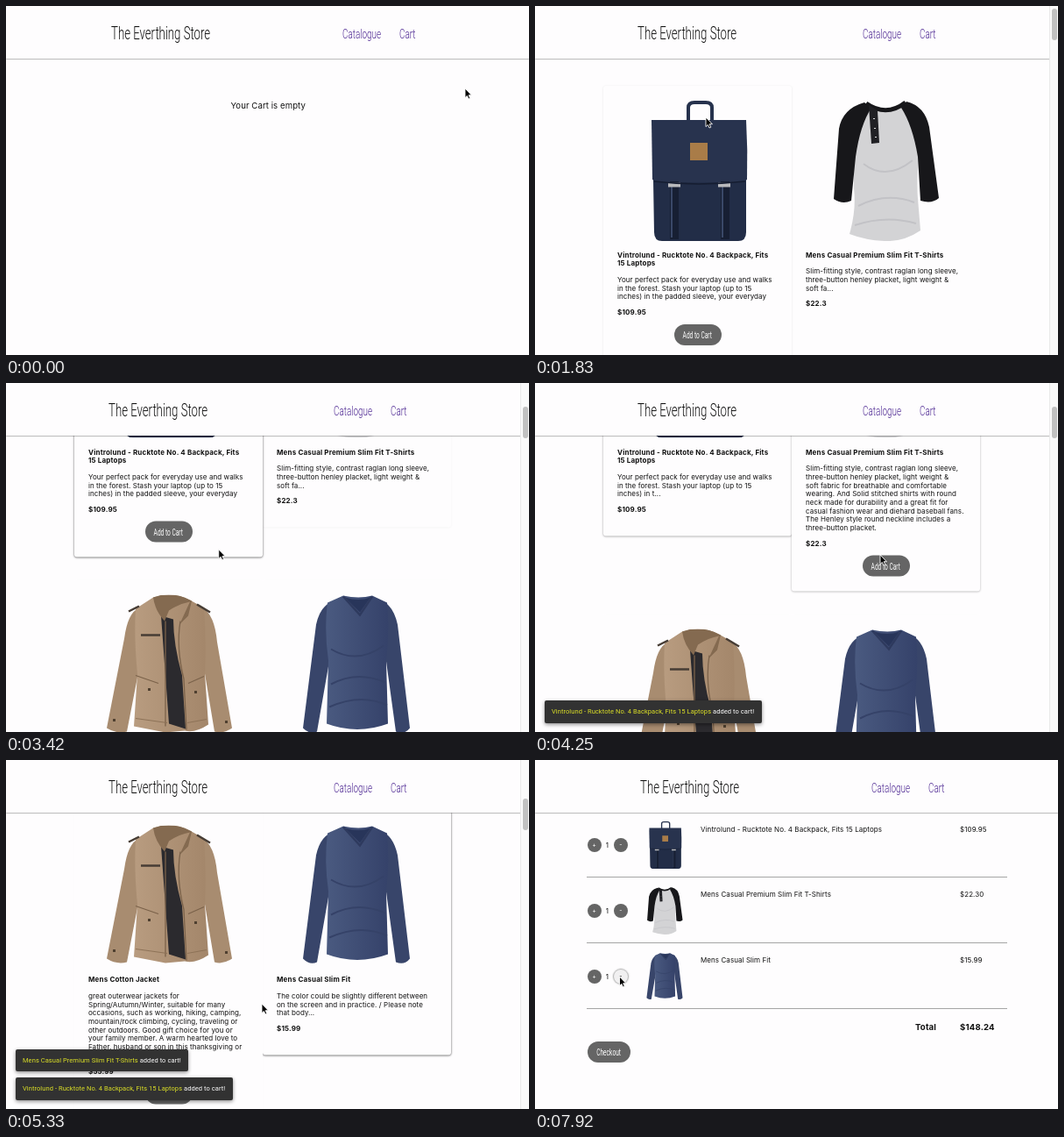
Write an HTML page that moves like this. It is 597 px wide and 398 px high and loops after 8000 ms.

```html
<!DOCTYPE html>
<html lang="en">
<head>
<meta charset="utf-8">
<title>Store</title>
<style>
html, body { margin: 0; width: 100%; height: 100%; overflow: hidden; background: #fefdfe; }
#stage { position: relative; width: 597px; height: 398px; overflow: hidden; background: #fefdfe;
  color: #111; font: 8px/9.7px Inter, sans-serif; letter-spacing: .07px; white-space: nowrap; }
#stage [hidden] { display: none; }
.page { position: absolute; inset: 0; }
.label { position: absolute; line-height: 0; }
.narrow { font-family: Roboto, sans-serif; font-weight: 300; letter-spacing: 0; transform: scaleX(.66); transform-origin: 0 0; }
b { font-weight: 700; letter-spacing: .17px; }
header { position: absolute; inset: 0 0 auto; height: 59.5px; background: #fefdfe; box-shadow: 0 .5px 1.5px rgba(0,0,0,.65); }
header .narrow { top: 32px; font-size: 15px; color: #4b2591; }
header #brand { top: 30.5px; font-size: 20px; color: #111; }

#list { position: absolute; left: 78px; top: 91px; }
.row { display: flex; align-items: flex-start; margin-bottom: 26px; }
.card { position: relative; box-sizing: border-box; width: 215px; padding: 17px 16px 16.5px; background: #fefdfe; border-radius: 3px; }
.card.open { z-index: 1; }
.card::before { content: ""; position: absolute; inset: 0; border-radius: 3px; opacity: var(--glow, 0);
  box-shadow: 0 .5px 2.5px rgba(0,0,0,.75); }
.card > * { position: relative; white-space: pre; }
.card svg { display: block; width: 150px; height: 160px; margin: 0 auto 11.5px; }
.card b { display: block; }
.card p { margin: 9px 0 8px; }
.card .full, .card .pill { display: none; }
.card.open .full, .card.open .pill { display: block; }
.card.open .short { display: none; }
.card .price { margin-bottom: 8.5px; }
.pill { width: 54px; height: 24px; margin: 0 auto; border-radius: 12px; background: #656565; color: #fff; text-align: center; }
.pill span { display: inline-block; font-size: 10px; font-weight: 400; line-height: 25px; transform-origin: 50% 0; margin: 0 -20px; }

#bar { position: absolute; right: 0; top: 0; width: 10px; height: 398px; background: #fafafa; box-shadow: inset 1px 0 #e9e9e9; }
#thumb { position: absolute; left: 2.5px; width: 6.5px; height: 36px; border-radius: 4px; background: #c1c1c1; }

.toast { position: absolute; left: 10.5px; box-sizing: border-box; min-width: 172px; height: 25.5px; padding: 0 8.5px;
  border-radius: 2px; background: #323232; color: #fff; font: 7.5px/25.5px Roboto, sans-serif;
  box-shadow: 0 1.5px 4px rgba(0,0,0,.45); }
.toast i { font-style: normal; color: #dde126; }

.rule { position: absolute; left: 59px; width: 479.5px; height: 1px; background: #a5a5a5; }
.round { position: absolute; box-sizing: border-box; width: 16px; height: 16px; border-radius: 50%;
  background: #656565; color: #fff; font-size: 7px; line-height: 16px; text-align: center; }
.round.hot { background: #f1f0f1; color: #222; box-shadow: 0 0 1.5px 1px #aaa; }
#cart svg { position: absolute; left: 123px; width: 50.6px; height: 54px; }
#cart .pill { position: absolute; left: 59.5px; top: 321px; width: 49.5px; }
.total { font-size: 9.6px; }
#cursor { position: absolute; left: 0; top: 0; width: 14px; height: 18px; overflow: visible; }
</style>
</head>
<body>
<svg width="0" height="0" style="position:absolute">
  <linearGradient id="wool"><stop stop-color="#4a5a80"/><stop offset="1" stop-color="#35426a"/></linearGradient>
  <linearGradient id="canvas"><stop stop-color="#b89c80"/><stop offset="1" stop-color="#a3866a"/></linearGradient>
  <symbol id="pack" viewBox="-75 0 150 160">
    <path d="M-11 24V8q0-6 7-6H9q7 0 7 6v16" fill="none" stroke="#26324d" stroke-width="4"/>
    <path d="M-52 30H55V150q0 10-9 10H-41q-9 0-9-10z" fill="#222d47"/>
    <path d="M-53 22H55q2 34 1 68l-6 3H-46l-6-3z" fill="#28334e"/>
    <path d="M-27 92v66M31 92v66" stroke="#171f33" stroke-width="10"/>
    <path d="M-30 98v58M28 98v58" stroke="#3a4868" stroke-width="2"/>
    <path d="M-34 96h14M23 96h14" stroke="#b9babd" stroke-width="5"/>
    <path d="M-50 92q50 6 104 0" fill="none" stroke="#151d31" stroke-width="1.5"/>
    <path d="M-9 48h20v20h-20z" fill="#a97c48"/>
  </symbol>
  <symbol id="tee" viewBox="-75 0 150 160">
    <path d="M-23 5Q0 16 21 5L38 60Q34 90 36 112L39 148Q20 161-2 160T-42 152Q-34 124-37 100V60z" fill="#d3d3d5"/>
    <path d="M-25 2Q-50 9-54 32L-60 112Q-50 119-40 114L-35 64Q-30 28-17 8zM23 1Q44 6 49 30L60 111Q52 118 39 114L36 64Q30 28 17 8z" fill="#17171a"/>
    <path d="M-23 3Q0 19 22 2" fill="none" stroke="#17171a" stroke-width="5"/>
    <path d="M-20 5l10 6 2 37-9 1z" fill="#202024"/>
    <path d="M-14 20v1M-13 31v1M-12 41v1" stroke="#ddd" stroke-width="2"/>
    <path d="M-26 72Q0 92 30 68M-32 120Q0 104 32 116M-36 142Q0 130 34 140" fill="none" stroke="#c2c2c6" stroke-width="2"/>
  </symbol>
  <symbol id="jacket" viewBox="-75 0 150 160">
    <path d="M-34 15Q-47 20-51 50L-71 152Q-60 159-48 156L-34 84zM38 15Q52 22 55 54L72 152Q62 159 52 156L40 84z" fill="#a88c70"/>
    <path d="M-18 3Q4-4 24 6L40 15Q43 60 41 90L45 148Q30 158 18 155L-4 157-40 150-36 90Q-40 50-38 16z" fill="url(#canvas)"/>
    <path d="M-9 24L5 28Q5 56 15 92L19 153 0 147z" fill="#2b2a2e"/>
    <path d="M-18 3Q-16 18-5 30L0 18Q12 10 24 8L12 34 22 24 26 7Q4-5-18 3z" fill="#846a50"/>
    <path d="M13 30Q8 60 17 96L20 154M-4 30V150M-38 92l26 9M22 101l18-8" fill="none" stroke="#7b624a" stroke-width="1.3"/>
    <path d="M-46 19l12-6M32 11l15 9M-32 46h22" stroke="#473d35" stroke-width="2.5"/>
    <path d="M-24 108h3M29 111h3M-64 143h3M64 145h3" stroke="#4f4030" stroke-width="3"/>
    <path d="M-38 141l36 5M21 146l22-4" stroke="#8d7257"/>
  </symbol>
  <symbol id="sweater" viewBox="-75 0 150 160">
    <path d="M-26 7Q-42 11-47 34L-62 152Q-54 160-46 156L-32 76zM26 6Q41 11 46 34L60 152Q54 160 44 156L33 76z" fill="#38456a"/>
    <path d="M-16 1Q2 5 17 1L34 9Q37 40 33 76L35 147Q0 160-35 147L-33 75Q-38 40-34 9z" fill="url(#wool)"/>
    <path d="M-14 3Q2 8 15 3L3 20z" fill="#28355a"/>
    <path d="M-16 2L3 23 17 2" fill="none" stroke="#2e3a5e" stroke-width="2.5"/>
    <path d="M-30 62Q0 80 30 58M-30 102Q0 86 32 100M-32 128Q4 112 34 126" fill="none" stroke="#354268" stroke-width="2"/>
  </symbol>
</svg>
<div id="stage">
  <div class="page" id="empty"><span class="label" style="left:256.5px;top:114px;font-size:9.6px">Your Cart is empty</span></div>
  <div class="page" id="shop"><div id="list"></div></div>
  <div class="page" id="cart"></div>
  <header>
    <span class="label narrow" id="brand">The Everthing Store</span>
    <span class="label narrow" id="catalogue">Catalogue</span>
    <span class="label narrow" id="cartLink">Cart</span>
  </header>
  <div id="bar"><div id="thumb"></div></div>
  <div id="toasts"></div>
  <svg id="cursor" stroke="#fff" stroke-width=".9" stroke-linejoin="round">
    <path id="arrow" d="M0 0V10.6L2.4 8.4 4 12 5.8 11.2 4.2 7.7H7.4z"/>
    <path id="beam" d="M-1.5-4.5Q0-4.5 0-3.5Q0-4.5 1.5-4.5M0-3.5V3.5M-1.5 4.5Q0 4.5 0 3.5Q0 4.5 1.5 4.5" fill="none" stroke="#333"/>
    <path id="hand" d="M-1 0Q0-1 1 0V4L5 5Q6 5 6 7L5 11H-1L-4 7Q-4 5-2 6L-1 7z" fill="#fff" stroke="#111"/>
  </svg>
</div>
<script>
const $ = id => document.getElementById(id);
const LOOP = 8000, SHOP_AT = 1500, CART_AT = 7000, FADE = 200;

const products = [
  { art: 'pack', name: 'Vintrolund - Rucktote No. 4 Backpack, Fits\n15 Laptops', price: '$109.95',
    short: 'Your perfect pack for everyday use and walks\nin the forest. Stash your laptop (up to 15\ninches) in t...',
    full: 'Your perfect pack for everyday use and walks\nin the forest. Stash your laptop (up to 15\ninches) in the padded sleeve, your everyday' },
  { art: 'tee', name: 'Mens Casual Premium Slim Fit T-Shirts', price: '$22.3',
    short: 'Slim-fitting style, contrast raglan long sleeve,\nthree-button henley placket, light weight &amp;\nsoft fa...',
    full: 'Slim-fitting style, contrast raglan long sleeve,\nthree-button henley placket, light weight &amp;\nsoft fabric for breathable and comfortable\nwearing. And Solid stitched shirts with round\nneck made for durability and a great fit for\ncasual fashion wear and diehard baseball fans.\nThe Henley style round neckline includes a\nthree-button placket.' },
  { art: 'jacket', name: 'Mens Cotton Jacket', price: '$55.99',
    short: 'great outerwear jackets for\nSpring/Autumn/Winter, suitable for many\noccasions, such as working, hiki...',
    full: 'great outerwear jackets for\nSpring/Autumn/Winter, suitable for many\noccasions, such as working, hiking, camping,\nmountain/rock climbing, cycling, traveling or\nother outdoors. Good gift choice for you or\nyour family member. A warm hearted love to\nFather, husband or son in this thanksgiving or\nChristmas Day.' },
  { art: 'sweater', name: 'Mens Casual Slim Fit', price: '$15.99',
    short: 'The color could be slightly different between\non the screen and in practice. / Please note\nthat body...',
    full: 'The color could be slightly different between\non the screen and in practice. / Please note\nthat body builds vary by person, therefore,\ndetailed size information should be reviewed\nbelow on the product description.' },
];
const [pack, tee, jacket, sweater] = products.keys();
const flat = p => p.name.replace('\n', ' ');
const art = (p, style = '') => `<svg style="${style}"><use href="#${p.art}"/></svg>`;
const pill = text => `<div class="pill"><span class="narrow">${text}</span></div>`;
const label = (x, y, text, cls = '') => `<span class="label ${cls}" style="left:${x}px;top:${y}px">${text}</span>`;

const card = p => `<div class="card">${art(p)}<b>${p.name}</b><p class="short">${p.short}</p>` +
  `<p class="full">${p.full}</p><b class="price">${p.price}</b>${pill('Add to Cart')}</div>`;
$('list').innerHTML = [0, 2].map(i => `<div class="row">${products.slice(i, i + 2).map(card).join('')}</div>`).join('');

const bought = [pack, tee, sweater].map(i => products[i]);
const round = (x, y, sign) => `<span class="round" style="left:${x - 8}px;top:${y - 8}px">${sign}</span>`;
$('cart').innerHTML = bought.map((p, i) => {
  const y = 97 + i * 74.8;
  return round(67.5, y, '+') + label(80.8, y, '1') + round(98, y, '-') + art(p, `top:${y - 27}px`) +
    label(189, y - 18.5, flat(p)) + label(485, y - 18.5, p.price.replace(/\.3$/, '.30')) +
    `<div class="rule" style="top:${y + 36}px"></div>`;
}).join('') + label(434, 305, '<b>Total</b>', 'total') + label(485, 305, '<b>$148.24</b>', 'total') + pill('Checkout');

$('toasts').innerHTML = bought.map((p, i) =>
  `<div class="toast" style="top:${362 - i * 32.3}px"><i>${flat(p)}</i> added to cart!</div>`).join('');

const cards = [...document.querySelectorAll('.card')];
const toasts = [...document.querySelectorAll('.toast')];
const lastMinus = [...document.querySelectorAll('.round')].pop();

// [time, x, y]
const pointer = [[40, 524, 94], [400, 370, 8], [750, 193, 43], [960, 193, 43], [1170, 400, 30], [1500, 400, 30],
  [1820, 195, 127], [1900, 195, 127], [2230, 356, 231], [3050, 356, 231], [3650, 188, 170], [3950, 188, 170],
  [4250, 394, 196], [4700, 396, 199], [5060, 396, 230], [5330, 292, 278], [5750, 400, 348],
  [6050, 400, 348], [6500, 415, 51], [6700, 454, 32], [7430, 454, 32], [7780, 108, 260], [7900, 96.5, 247]];
const scrolling = [[2450, 0], [3400, 205.5], [4830, 205.5], [5300, 348.5]];
const hovers = [[0, -1], [1785, pack], [2010, tee], [3250, pack], [4160, tee], [5040, sweater],
  [5315, jacket], [5380, sweater], [6480, -1]];
const toastTimes = [3850, 4450, 5950];

const clamp = v => Math.min(1, Math.max(0, v));
const smooth = v => v * v * (3 - 2 * v);
const between = (t, a, b) => t >= a && t < b;

function sample(track, t) {
  const next = track.findIndex(k => k[0] > t);
  if (next === 0) return track[0].slice(1);
  if (next < 0) return track[track.length - 1].slice(1);
  const a = track[next - 1], b = track[next], u = smooth((t - a[0]) / (b[0] - a[0]));
  return a.slice(1).map((v, i) => v + (b[i + 1] - v) * u);
}

function glow(index, t) {
  let level = 0;
  hovers.forEach(([start, target], i) => {
    const end = Math.min(t, i + 1 < hovers.length ? hovers[i + 1][0] : LOOP);
    if (end > start) level = clamp(level + (target === index ? 1 : -1) * (end - start) / FADE);
  });
  return smooth(level);
}

function render(t) {
  const shopping = between(t, SHOP_AT, CART_AT);
  $('empty').hidden = t >= SHOP_AT;
  $('shop').hidden = $('bar').hidden = $('toasts').hidden = !shopping;
  $('cart').hidden = t < CART_AT;

  $('brand').style.left = (shopping ? 117.2 : 119.5) + 'px';
  $('catalogue').style.left = (shopping ? 374 : 383.5) + 'px';
  $('cartLink').style.left = (shopping ? 439 : 449) + 'px';
  $('catalogue').style.color = between(t, 1330, SHOP_AT) ? '#e00' : '';

  const [scroll] = sample(scrolling, t);
  $('list').style.transform = `translateY(${-scroll}px)`;
  $('thumb').style.top = 2.5 + scroll * .12 + 'px';

  const hovered = hovers.filter(h => h[0] <= t).pop()[1];
  cards.forEach((el, i) => {
    el.classList.toggle('open', i === hovered);
    el.style.setProperty('--glow', glow(i, t));
  });
  toasts.forEach((el, i) => {
    const u = clamp((t - toastTimes[i]) / 225);
    el.hidden = u === 0;
    el.style.transform = `translateX(${-270 * (1 - u) ** 3}px)`;
  });

  const [x, y] = sample(pointer, t);
  const overLink = between(t, 1120, 1540) || between(t, 6620, 7490);
  const overText = between(t, 2700, 3080);
  $('cursor').style.transform = `translate(${x}px, ${y}px)`;
  $('hand').style.display = overLink ? '' : 'none';
  $('beam').style.display = overText ? '' : 'none';
  $('arrow').style.display = overLink || overText ? 'none' : '';
  lastMinus.classList.toggle('hot', t >= 7840);
}

function tick() {
  render(performance.now() % LOOP);
  requestAnimationFrame(tick);
}
tick();
</script>
</body>
</html>
```
